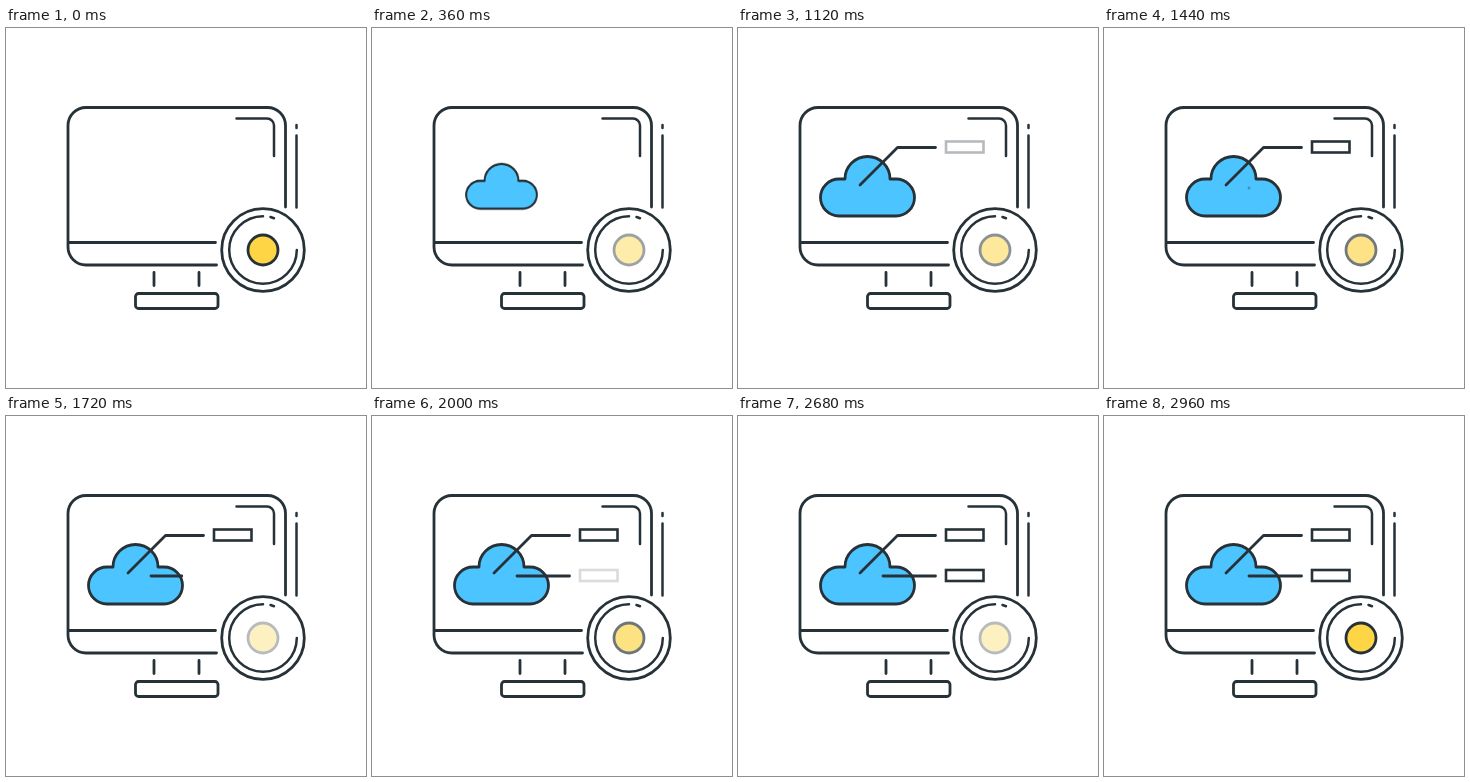
Write an HTML page that moves like this. It is 360 px wide and 360 px high and loops after 3 s.

```html
<!DOCTYPE html>
<html lang="en">
<head>
<meta charset="utf-8">
<title>Cloud monitor</title>
<style>
  html, body { margin: 0; width: 100%; height: 100%; overflow: hidden; background: #fff; }
  svg { display: block; width: 100%; height: 100%; }
  .ink { fill: none; stroke: #263238; stroke-width: 2.8; stroke-linecap: round; stroke-linejoin: round; }
  .cloud, .line, .tag, .dot { animation: 3s linear infinite; }

  .cloud { fill: #4cc4ff; transform-origin: 129.5px 158.5px; animation-name: grow; }
  .line { stroke-dasharray: 1 2; }
  .line.a { animation-name: draw-a; }
  .line.b { animation-name: draw-b; }
  .tag { stroke-linejoin: miter; stroke-width: 2.6; }
  .tag.a { animation-name: show-a; }
  .tag.b { animation-name: show-b; }
  .dot { fill: #fdd545; animation-name: blink; }

  /* Each step takes 16% of the loop: cloud, line, tag, line, tag. */
  @keyframes grow { 0% { transform: scale(0); } 16%, 100% { transform: scale(1); } }
  @keyframes draw-a {
    0%, 15.5% { stroke-dashoffset: 1; opacity: 0; }
    15.6% { opacity: 1; }
    31.5%, 100% { stroke-dashoffset: 0; opacity: 1; }
  }
  @keyframes draw-b {
    0%, 48% { stroke-dashoffset: 1; opacity: 0; }
    48.1% { opacity: 1; }
    64%, 100% { stroke-dashoffset: 0; opacity: 1; }
  }
  @keyframes show-a { 0%, 32% { opacity: 0; } 48%, 100% { opacity: 1; } }
  @keyframes show-b { 0%, 64% { opacity: 0; } 80%, 100% { opacity: 1; } }
  @keyframes blink {
    0%, 97.5%, 100% { opacity: 1; }
    9.5%, 25.5%, 41.5%, 57.5%, 73.5%, 89.5% { opacity: .32; }
    17.5%, 33.5%, 49.5%, 65.5%, 81.5% { opacity: .73; }
  }
</style>
</head>
<body>
<svg viewBox="0 0 360 360">
  <g class="ink">
    <!-- monitor and stand -->
    <path d="M279.5 179V97.500a18 18 0 0 0-18-18H80a18 18 0 0 0-18 18V219a18 18 0 0 0 18 18H210.500M62 214.500H209.500"/>
    <path d="M230.500 90.500H261a7 7 0 0 1 7 7V128M290.500 97V100M290.500 107.500V179.500" stroke-width="2.5"/>
    <path d="M148 244.500V257.500M193 244.500V257.500"/>
    <rect x="129.500" y="265.500" width="82.500" height="15" rx="3"/>
    <!-- lens -->
    <circle cx="257" cy="222" r="41.300"/>
    <path d="M290.800 222A33.800 33.800 0 1 1 257 188.200M264.500 189L268 190.200" stroke-width="2.5"/>
    <circle class="dot" cx="257" cy="222" r="15"/>
    <!-- screen content -->
    <path class="cloud" d="M101 188a18.500 18.500 0 0 1 0-37h6a22.500 22.500 0 0 1 45 0h6a18.500 18.500 0 0 1 0 37z"/>
    <path class="line a" pathLength="1" d="M122 157L159.500 119.500H197.500"/>
    <path class="line b" pathLength="1" d="M145 160H197.500"/>
    <rect class="tag a" x="208" y="113.500" width="37.500" height="11"/>
    <rect class="tag b" x="208" y="154" width="37.500" height="11"/>
  </g>
</svg>
</body>
</html>
```
